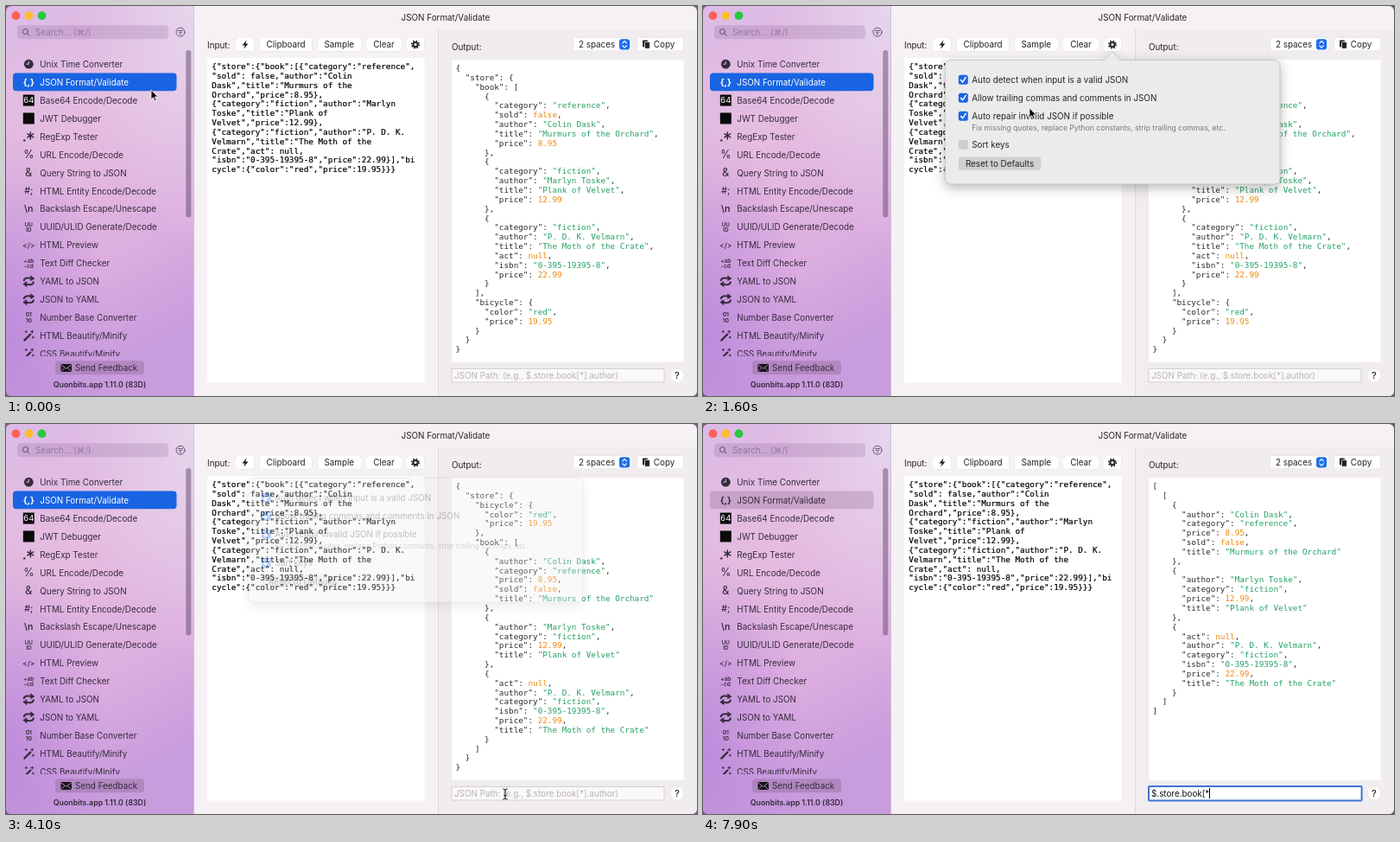
Animation, 800 px wide and 451 px high, one loop 8000 ms. Source, as an HTML page:

```html
<!DOCTYPE html>
<html lang="en">
<head>
<meta charset="utf-8">
<title>JSON Format/Validate</title>
<style>
  html, body { margin: 0; width: 100%; height: 100%; overflow: hidden; background: #7a5a86; }
  #stage { position: relative; width: 800px; height: 451px; overflow: hidden; border-radius: 6px; }
  svg, pre, .typed, #cursor { position: absolute; left: 0; top: 0; margin: 0; }
  svg { overflow: visible; }
  text, .typed { font: 9.86px Inter, "DejaVu Sans", sans-serif; fill: #262226; white-space: pre; }
  .mid { text-anchor: middle; }
  .side { fill: #352b3b; }
  .white { fill: #fff; }
  .small { font-size: 8.6px; fill: #787478; }
  .ver { font-size: 8.8px; font-weight: 600; fill: #33283a; }
  .hint { fill: #b7b2b7; }
  .icon { fill: currentColor; text-anchor: middle; }
  .line { fill: none; stroke: currentColor; stroke-linecap: round; }
  .btn { fill: #fff; filter: drop-shadow(0 .5px .7px rgba(0, 0, 0, .25)); }
  pre { font: 9.31px/10.84px "DejaVu Sans Mono", monospace; color: #2b2b2b; }
  .in { left: 238.3px; top: 65px; color: #000; -webkit-text-stroke: .2px #000; }
  .out { left: 520.5px; top: 67px; }
  .s { color: #22a063; }
  .n { color: #f08a0c; }
  .typed { left: 519px; top: 420px; line-height: 14px; color: #111; }
  .typed i { display: inline-block; width: 1px; height: 12px; background: #000; vertical-align: -2px; }
  .timed { animation: none 8s step-end -40ms infinite; }

  #popover { transform-origin: 474px 53px; animation: popover 8s linear -40ms infinite;
             filter: drop-shadow(0 4px 7px rgba(0, 0, 0, .28)); }
  @keyframes popover {
    0%, 14.5% { opacity: 0; transform: scale(.08); }
    15% { opacity: .4; transform: scale(.12); }
    16.25% { opacity: .85; transform: scale(.75); }
    17.5%, 50% { opacity: 1; transform: none; }
    52.5%, 100% { opacity: 0; transform: none; }
  }
  #cursor { animation: cursor 8s linear -40ms infinite; }
  @keyframes cursor {
    0%, 1.25% { transform: translate(168px, 97px); animation-timing-function: ease-in-out; }
    11.25%, 15% { transform: translate(476px, 44px); }
    16.25% { transform: translate(466px, 52px); }
    20% { transform: translate(390px, 112px); animation-timing-function: ease-out; }
    26.25%, 35% { transform: translate(299px, 157px); animation-timing-function: ease-in-out; }
    45%, 100% { transform: translate(578px, 428px); }
  }
</style>
</head>
<body>
<div id="stage"></div>
<script>
const rules = [];
// Visible only between two times of the 8 s loop.
function show(from, to = 8000) {
  const name = 'show' + rules.length;
  rules.push(`@keyframes ${name} { 0%, 100% { visibility: hidden }
    ${from / 80}% { visibility: visible } ${to / 80}% { visibility: hidden } }`);
  return `style="animation-name:${name}"`;
}

const esc = s => s.replace(/&/g, '&amp;').replace(/</g, '&lt;');
const text = (x, y, s, cls = '', attrs = '') => `<text x="${x}" y="${y}" class="${cls}" ${attrs}>${esc(s)}</text>`;
const rect = (x, y, w, h, r, attrs) => `<rect x="${x}" y="${y}" width="${w}" height="${h}" rx="${r}" ${attrs}/>`;
const button = (x, y, w, h, label = '') =>
  rect(x, y, w, h, 3.5, 'class="btn"') + text(x + w / 2, y + h / 2 + 3.6, label, 'mid');
const layer = (id, body) => `<svg id="${id}" width="800" height="451">${body}</svg>`;

/* Sidebar */
const arc = '<path class="line" stroke-width="2" d="M-5.5 -1C-5 -4.5 0 -4.2 3 -3.5"/><path d="M2 -7L7 -3.2L2 0Z" fill="currentColor"/>';
const shapes = {
  clock: '<circle r="5.4" fill="currentColor"/><path d="M0 -3.5V0H-3" fill="none" stroke="#e4c2e4"/>',
  square: rect(-6.5, -6.5, 13, 13, 0, 'fill="#0a0a0a"'),
  base64: rect(-6.5, -6.5, 13, 13, 0, 'fill="#0a0a0a"') + text(0, 3.4, '64', 'mid white', 'style="font-size:9.5px"'),
  regex: '<circle cx="-5" cy="4.5" r="1.2" fill="currentColor"/><path class="line" stroke-width="1.5" d="M2 -5V3M-1.5 -3L5.5 1M-1.5 1L5.5 -3"/>',
  swap: arc + `<g transform="rotate(180)">${arc}</g>`,
  wand: '<path class="line" stroke-width="2.2" d="M-5 5.5L2 -1.5"/><path class="line" d="M4 -6V-3M2.5 -4.5H5.5M-3 -5.5V-3.5M-4 -4.5H-2M5 1V3M4 2H6"/>'
};
const tools = [
  ['Unix Time Converter', 'clock'],
  ['JSON Format/Validate', '{,}', 10.5, 700],
  ['Base64 Encode/Decode', 'base64'],
  ['JWT Debugger', 'square'],
  ['RegExp Tester', 'regex'],
  ['URL Encode/Decode', '%', 12.5],
  ['Query String to JSON', '&', 13],
  ['HTML Entity Encode/Decode', '#;', 10.5, 500],
  ['Backslash Escape/Unescape', '\\n', 10.5, 600],
  ['UUID/ULID Generate/Decode', 'UU|ID', 6.3, 600],
  ['HTML Preview', '</>', 8.5, 500],
  ['Text Diff Checker', '+ab|-cd', 6.5, 600],
  ['YAML to JSON', 'swap'],
  ['JSON to YAML', 'swap'],
  ['Number Base Converter', '01|10', 6.8, 600],
  ['HTML Beautify/Minify', 'wand'],
  ['CSS Beautify/Minify', 'wand']
];

function glyph(icon, size, weight = 400) {
  if (shapes[icon]) return shapes[icon];
  const parts = icon.split('|');
  const style = `style="font-size:${size}px;font-weight:${weight}"`;
  return parts.map((s, i) =>
    text(0, parts.length > 1 ? i * 6.3 - .8 : size * .36, s, 'icon', style)).join('');
}

function row([label, ...icon], i, cls = 'side') {
  const y = 67.2 + i * 20.93;
  return `<g transform="translate(26.3 ${y})" color="${cls === 'side' ? '#352b3b' : '#fff'}">${glyph(...icon)}</g>`
    + text(39.3, y + 3.8, label, cls);
}

const pick = fill => rect(8, 77.6, 189.5, 20.6, 4, `fill="${fill}"`);
const rows = tools.map((tool, i) => i !== 1 ? row(tool, i)
  : `<g class="timed" ${show(0, 4400)}>${pick('#1964e2')}${row(tool, i, 'white')}</g>`
  + `<g class="timed" ${show(4400)}>${pick('rgba(70,30,80,.17)')}${row(tool, i)}</g>`).join('');

const sidebar = `
  <defs>
    <linearGradient id="tint" x2=".25" y2="1">
      <stop stop-color="#dcbbe6"/><stop offset=".4" stop-color="#e6bce0"/>
      <stop offset=".75" stop-color="#dcade0"/><stop offset="1" stop-color="#c99cdd"/>
    </linearGradient>
    <radialGradient id="glow" cx="0" cy=".85" r=".55">
      <stop stop-color="#bd8bdb"/><stop offset="1" stop-color="#bd8bdb" stop-opacity="0"/>
    </radialGradient>
    <radialGradient id="light" cx="1" cy="0" r=".6">
      <stop stop-color="#e6d5ec"/><stop offset="1" stop-color="#e6d5ec" stop-opacity="0"/>
    </radialGradient>
    <clipPath id="list"><path d="M0 48H217V405H0Z"/></clipPath>
  </defs>
  ${['tint', 'glow', 'light'].map(id => rect(0, 0, 217, 451, 0, `fill="url(#${id})"`)).join('')}
  ${['#fe5f57', '#febc2e', '#28c840'].map((c, i) => `<circle cx="${11.5 + 15 * i}" cy="11.2" r="4.9" fill="${c}"/>`).join('')}
  ${rect(13, 22.3, 175, 16, 4, 'fill="rgba(100,60,120,.16)"')}
  <g color="#5c4965"><circle class="line" cx="22.5" cy="29.5" r="3"/><path class="line" d="M24.8 31.8L27.2 34.2"/>
  <circle class="line" cx="202" cy="30.2" r="5" stroke-width=".9"/><path class="line" stroke-width=".9" d="M199.3 28.4H204.7M200.2 30.4H203.8M201.2 32.4H202.8"/></g>
  ${text(34, 33.9, 'Search... (⌘/)', '', 'style="fill:#927a9a"')}
  <g clip-path="url(#list)">${rows}</g>
  ${rect(208.3, 51, 6, 193.5, 3, 'fill="rgba(90,65,105,.48)"')}
  ${rect(57, 410.3, 103, 16, 3.5, 'fill="rgba(100,70,100,.24)"')}
  ${rect(63.5, 414, 12.5, 9, 1, 'fill="#17121a"')}
  <path d="M64 415L69.7 419.4L75.5 415M64 422.5L68 418.5M75.5 422.5L71.5 418.5" fill="none" stroke="#cfa9d3" stroke-width=".8"/>
  ${text(80, 422, 'Send Feedback', 'side')}
  ${text(108.5, 441.2, 'Quonbits.app 1.11.0 (83D)', 'ver mid')}`;

/* Main area */
const main = `
  ${rect(217, 0, 583, 451, 0, 'fill="#f5f1f5"')}
  ${rect(500, 27, 300, 424, 0, 'fill="#f0ecf0"')}
  <path d="M217.5 0V451" stroke="#d3bfd6"/><path d="M500.5 27V451" stroke="#dfdadf"/>
  ${text(509, 17, 'JSON Format/Validate', 'mid')}
  ${text(233, 48.6, 'Input:')}${text(516, 51.4, 'Output:')}
  ${button(266, 37, 21.5, 15.3)}${button(293.5, 37, 61, 15.3, 'Clipboard')}
  ${button(360.5, 37, 50.5, 15.3, 'Sample')}${button(417, 37, 41, 15.3, 'Clear')}${button(464, 37, 20.5, 15.3)}
  <path d="M278.5 39.2L273.6 45.4H276.6L275.3 49.8L280.4 43.4H277.3Z" fill="#1c1a1c"/>
  <g transform="translate(474 44.6)" fill="none" stroke="#262326">
    <circle r="2.6" stroke-width="2"/><circle r="4.2" stroke-width="1.6" stroke-dasharray="1.65"/></g>
  ${button(656.5, 36.8, 67.5, 15)}${text(663, 47.8, '2 spaces')}
  ${rect(710, 38.2, 12.2, 12.2, 3, 'fill="#1e6fe8"')}
  <path d="M713.8 42.8L716.1 40.5L718.4 42.8M713.8 45.8L716.1 48.1L718.4 45.8" class="line" color="#fff" stroke-width="1.2"/>
  ${button(730.5, 36.8, 54, 15)}${text(749.8, 47.8, 'Copy')}
  ${rect(737, 39.5, 6, 8, 1, 'fill="#222"')}${rect(739.4, 41.5, 6, 7.8, 1, 'fill="#222" stroke="#fff" stroke-width=".8"')}
  ${rect(233, 60, 251.5, 375.5, 0, 'fill="#fff"')}
  ${rect(516, 62, 268.5, 350, 0, 'fill="#fff"')}
  ${rect(516, 419.5, 246, 15.5, 0, 'fill="#faf8fa" stroke="#d4cfd4"')}
  <g class="timed" ${show(4400)}>${rect(516, 419, 246.6, 16.6, 1, 'fill="#fff" stroke="#3f74d0" stroke-width="2"')}</g>
  <g class="timed" ${show(0, 4800)}>${text(519, 431, 'JSON Path: (e.g., $.store.book[*].author)', 'hint')}</g>
  <circle cx="777" cy="427.2" r="7.8" class="btn"/>${text(777, 431.2, '?', 'mid', 'style="font-size:11px;font-weight:500"')}`;

/* JSON */
const data = { store: {
  book: [
    { category: 'reference', sold: false, author: 'Colin Dask', title: 'Murmurs of the Orchard', price: 8.95 },
    { category: 'fiction', author: 'Marlyn Toske', title: 'Plank of Velvet', price: 12.99 },
    { category: 'fiction', author: 'P. D. K. Velmarn', title: 'The Moth of the Crate', act: null, isbn: '0-395-19395-8', price: 22.99 }
  ],
  bicycle: { color: 'red', price: 19.95 }
} };
const input = `{"store":{"book":[{"category":"reference",
"sold": false,"author":"Colin
Dask","title":"Murmurs of the
Orchard","price":8.95},
{"category":"fiction","author":"Marlyn
Toske","title":"Plank of
Velvet","price":12.99},
{"category":"fiction","author":"P. D. K.
Velmarn","title":"The Moth of the
Crate","act": null,
"isbn":"0-395-19395-8","price":22.99}],"bi
cycle":{"color":"red","price":19.95}}}`;

function sortKeys(v) {
  if (Array.isArray(v)) return v.map(sortKeys);
  if (!v || typeof v !== 'object') return v;
  return Object.fromEntries(Object.keys(v).sort().map(k => [k, sortKeys(v[k])]));
}
const paint = v => JSON.stringify(v, null, 2).replace(/"[^"]*"(:?)|[\d.]+|null|false/g,
  (m, colon) => colon ? m : `<span class="${m[0] === '"' ? 's' : 'n'}">${m}</span>`);

const sorted = sortKeys(data);
const outputs = [
  [data, 0, 2700], [sorted, 2700, 6000], [[sorted.store], 6000, 7000], [[sorted.store.book], 7000, 8000]
].map(([v, from, to]) => `<pre class="out timed" ${show(from, to)}>${paint(v)}</pre>`).join('');

/* Typed path: the moment each prefix appears, starting with the empty one */
const path = '$.store.book[*';
const keys = [4400, 4800, 5200, 5400, 5500, 5600, 5800, 6000, 6200, 6500, 6700, 6800, 7000, 7400, 7900];
const typed = keys.map((at, i) =>
  `<span class="typed timed" ${show(at, keys[i + 1])}>${path.slice(0, i)}<i></i></span>`).join('');

/* Popover */
const tick = y => rect(295.8, y - 5.5, 11, 11, 2.5, 'fill="#1b66e4"')
  + `<path class="line" color="#fff" stroke-width="1.5" d="M298.6 ${y + .3}L300.6 ${y + 2.6}L304.2 ${y - 2.8}"/>`;
const option = (y, label) => text(311.3, y + 3.8, label);
const popover = `
  <path d="M287 62.5H463C468 62.5 471 53.5 474 53.5S480 62.5 485 62.5H661Q668 62.5 668 69.5V199Q668 206 661 206H287Q280.5 206 280.5 199V69.5Q280.5 62.5 287 62.5Z"
    fill="#ecebec" stroke="#c2bfc2" stroke-width=".8"/>
  ${tick(85.3)}${option(85.3, 'Auto detect when input is a valid JSON')}
  ${tick(106.2)}${option(106.2, 'Allow trailing commas and comments in JSON')}
  ${tick(127.2)}${option(127.2, 'Auto repair invalid JSON if possible')}
  ${text(311.3, 143.6, 'Fix missing quotes, replace Python constants, strip trailing commas, etc.', 'small')}
  ${rect(295.8, 154.7, 11, 11, 2.5, 'fill="#cdcbcd"')}
  <g class="timed" ${show(2700)}>${tick(160.2)}</g>${option(160.2, 'Sort keys')}
  ${rect(295.8, 174.5, 95.5, 15.3, 3.5, 'fill="#d1cfd1"')}${text(343.5, 185.7, 'Reset to Defaults', 'mid')}`;

const cursor = `<div id="cursor"><svg width="12" height="16">
  <path class="timed" ${show(0, 3500)} d="M0 0V11L2.5 8.7L4.2 12.6L6 11.8L4.3 8H7.7Z" fill="#000" stroke="#fff" stroke-width=".8"/>
  <path class="timed line" ${show(3500, 4800)} color="#111" d="M-2.3 -6Q0 -6 0 -4.5Q0 -6 2.3 -6M0 -4.5V4.5M-2.3 6Q0 6 0 4.5Q0 6 2.3 6M-1.2 1.6H1.2"/>
</svg></div>`;

stage.innerHTML = layer('window', main + sidebar) + `<pre class="in">${input}</pre>` + outputs + typed
  + layer('popover', popover) + cursor + `<style>${rules.join('\n')}</style>`;
</script>
</body>
</html>
```
